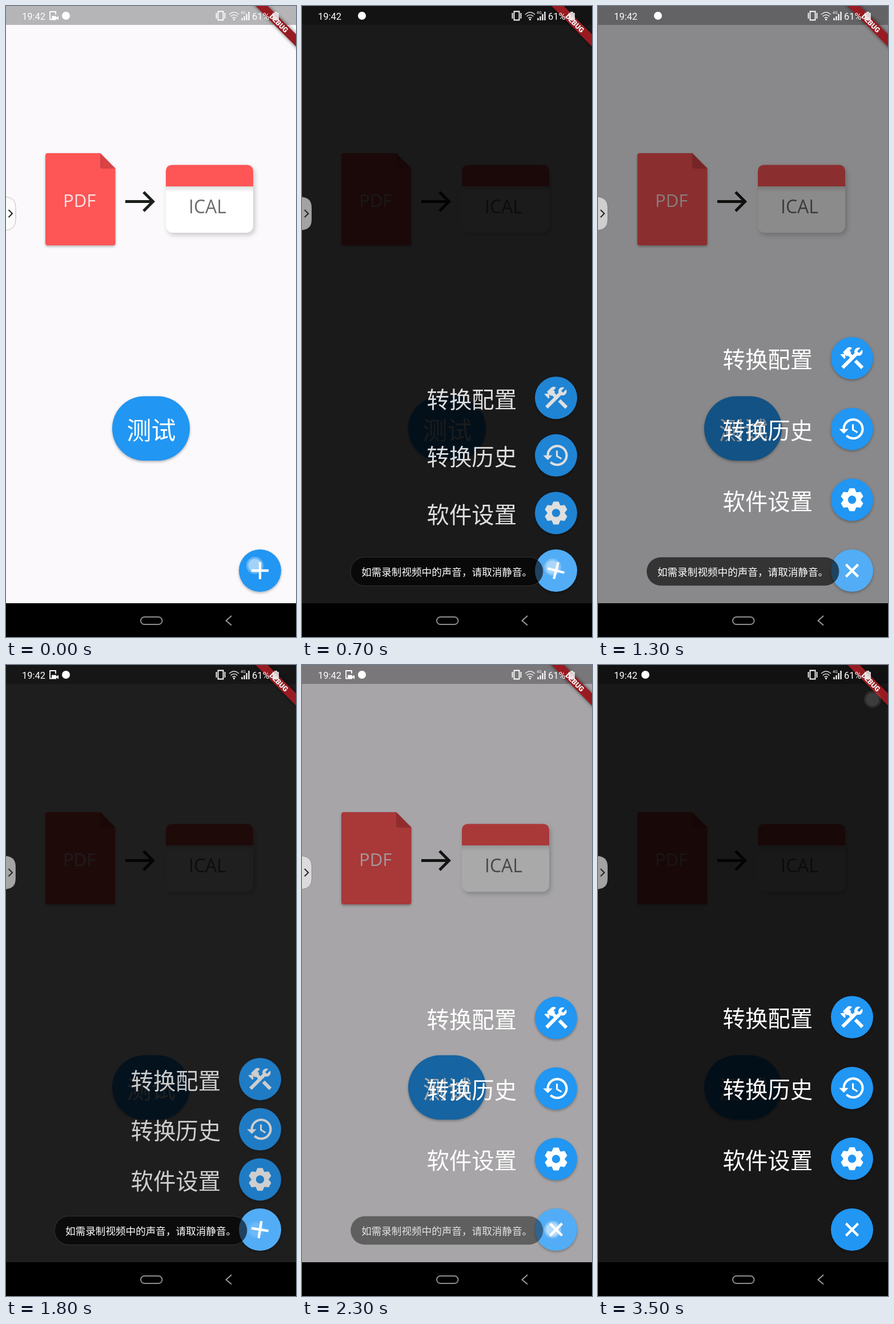
An HTML page for the animation above (3.6 s loop, 508 by 1102 pixels).

```html
<!DOCTYPE html>
<html lang="zh">
<head>
<meta charset="utf-8">
<style>
  html, body { margin: 0; width: 100%; height: 100%; overflow: hidden; background: #000; }
  svg { display: block; width: 100%; height: 100%; }
  .cjk { font-family: "Noto Sans CJK SC", "Noto Sans CJK", sans-serif; fill: #fff; }
  .ui { font-family: Roboto, sans-serif; fill: #fff; }
  .art { font-family: "Open Sans", "Noto Sans", sans-serif; }
  .blue { fill: #2196f3; }
  .lift { filter: drop-shadow(0 2px 2px rgba(0,0,0,.3)); }
  .line { fill: none; stroke: #fff; }
</style>
</head>
<body>
<svg viewBox="0 0 508 1102">
  <defs>
    <linearGradient id="fade" x2="0" y2="1">
      <stop stop-color="#ddd"/><stop offset="1" stop-color="#fff"/>
    </linearGradient>
  </defs>

  <!-- page -->
  <rect width="508" height="1102" fill="#fbf9fc"/>
  <g class="lift">
    <path d="M73 257H165L191.500 283.500V414q0 4-4 4H73q-4 0-4-4V261q0-4 4-4z" fill="#fe5556"/>
    <path d="M165 257V280q0 4 4 4H191.500z" fill="#d84345"/>
  </g>
  <text class="art" x="100" y="351" font-size="31" fill="#f8e4e6">PDF</text>
  <path d="M209 341.500H257M241 325l16.500 16.500L241 358" fill="none" stroke="#1b1f1b" stroke-width="5"/>
  <g style="filter:drop-shadow(3px 4px 4px rgba(0,0,0,.2))">
    <rect x="280" y="277.500" width="153" height="118.500" rx="12" fill="#fff"/>
    <rect x="280" y="315" width="153" height="10" fill="url(#fade)"/>
    <path d="M280 315V289.500q0-12 12-12H421q12 0 12 12V315z" fill="#fe5556"/>
  </g>
  <text class="art" x="320" y="362" font-size="32" fill="#6c6c6e">ICAL</text>
  <rect class="blue lift" x="186" y="681.500" width="136" height="112.500" rx="56.250"/>
  <text class="cjk" x="254.500" y="757" font-size="43" text-anchor="middle">测试</text>

  <rect id="shade" width="508" height="1102"/>
  <rect width="508" height="33" opacity=".28"/>

  <!-- menu -->
  <g id="menu"></g>
  <g transform="translate(445 986)">
    <circle class="blue lift" r="37"/>
    <circle id="glow" r="37" fill="#fff"/>
    <path id="plus" class="line" d="M-15 0H15M0-15V15" stroke-width="4.300"/>
  </g>

  <!-- corner banner -->
  <g transform="translate(508 0) rotate(45)">
    <rect x="-60" y="35" width="120" height="15" fill="#981b22" style="filter:drop-shadow(0 0 3px rgba(0,0,0,.6))"/>
    <text class="ui" y="47" font-size="12.500" font-weight="900" text-anchor="middle">DEBUG</text>
  </g>

  <!-- status bar -->
  <text class="ui" x="28" y="23.500" font-size="16.500">19:42</text>
  <g id="rec">
    <path class="line" d="M80 23.500H77V10H87V15" stroke-width="1.800"/>
    <path d="M80 17.500h8v2.500l4-2.500v7l-4-2.500v2.500h-8z" fill="#fff"/>
  </g>
  <circle id="note" cy="17" r="7" fill="#fff"/>
  <path class="line" d="M371.500 9.500h9v15h-9zM368.500 12v10M383.500 12v10" stroke-width="1.800"/>
  <g class="line" stroke-width="1.600">
    <path d="M391 15q8.500-8 17 0M393.700 18.200q5.800-5.400 11.600 0M396.500 21.300q3-2.800 6 0" opacity=".85"/>
  </g>
  <circle cx="399.500" cy="23.500" r="1.500" fill="#fff"/>
  <text class="ui" x="411" y="14" font-size="7">4G</text>
  <path class="line" d="M413.500 25v-4M417.500 25v-7M421.500 25v-11M425.500 25V10" stroke-width="2.200"/>
  <text class="ui" x="431" y="23.500" font-size="16.500">61%</text>
  <path d="M470 10h5v2h3v13h-11V12h3z" fill="#eee" opacity=".85"/>

  <!-- side handle -->
  <path d="M-2 333.500H1q16 2 16 18v22q0 16-16 18H-2z" fill="#fff" fill-opacity=".6" stroke="#000" stroke-opacity=".25"/>
  <path d="M4.500 356l6.500 6.500-6.500 6.500" fill="none" stroke="#222" stroke-width="2"/>

  <!-- navigation bar -->
  <rect y="1043" width="508" height="59"/>
  <rect x="236" y="1067" width="37.500" height="13" rx="6.500" fill="none" stroke="#8d8d8d" stroke-width="2"/>
  <path d="M395 1065l-9.500 8.500 9.500 8" fill="none" stroke="#999" stroke-width="2"/>

  <g id="toast">
    <rect x="85" y="962.500" width="337.500" height="50" rx="25" fill-opacity=".62" stroke="#fff" stroke-opacity=".13"/>
    <text class="cjk" x="104" y="994.500" font-size="17.600">如需录制视频中的声音，请取消静音。</text>
  </g>
  <g id="finger" fill="#fff">
    <circle r="15" opacity=".3"/>
    <circle r="11.500" opacity=".4"/>
  </g>
</svg>
<script>
const $ = id => document.getElementById(id);
const clamp = x => Math.max(0, Math.min(1, x));
const ramp = (t, from, length) => clamp((t - from) / length);
const LOOP = 3600, GAP = 123.67;

const tooth = '<path d="M-4.200-5L-2.200-9.700H2.200L4.200-5z" transform="rotate(ANGLE)"/>';
const gear = '<g transform="translate(12 12)"><circle r="5.400" fill="none" stroke="#fff" stroke-width="3.800"/>' +
  [0, 60, 120, 180, 240, 300].map(a => tooth.replace('ANGLE', a)).join('') + '</g>';
const clock = '<path d="M13 3c-4.970 0-9 4.030-9 9H1l3.890 3.890.070.140L9 12H6c0-3.870 3.130-7 7-7s7 3.130 7 7-3.130 7-7 7c-1.930 0-3.680-.790-4.940-2.060l-1.420 1.420C8.270 19.990 10.510 21 13 21c4.970 0 9-4.030 9-9s-4.030-9-9-9zm-1 5v5l4.280 2.540.720-1.210-3.500-2.080V8z"/>';
const tools = '<path d="M13.780 15.300l6 6 2.110-2.110-6-6zM17.500 10c1.930 0 3.500-1.570 3.500-3.500 0-.580-.160-1.120-.410-1.600l-2.700 2.700-1.490-1.490 2.700-2.700c-.480-.250-1.020-.410-1.600-.410C15.570 3 14 4.570 14 6.500c0 .410.080.800.210 1.160l-1.850 1.850-1.780-1.780.710-.710-1.410-1.410L12 3.490c-1.170-1.170-3.070-1.170-4.240 0L4.220 7.030l1.410 1.410H2.810l-.710.710 3.540 3.540.710-.710V9.150l1.410 1.410.710-.710 1.780 1.780-7.410 7.410 2.120 2.120L16.340 9.790c.360.130.750.210 1.160.210z"/>';

const items = [['软件设置', gear], ['转换历史', clock], ['转换配置', tools]];
$('menu').innerHTML = items.map(([label, icon]) => `<g>
  <text class="cjk" x="-226.500" y="17.500" font-size="39.400">${label}</text>
  <circle class="blue lift" r="37"/>
  <g fill="#fff" transform="scale(2.060) translate(-12 -12)">${icon}</g></g>`).join('');
const rows = [...$('menu').children];

// [finger down, menu starts to move]; taps open and close in turn
const taps = [[0, 75], [580, 593], [1130, 1175], [1650, 1666], [2190, 2207]];
const spots = [[436, 977], [439, 980], [439, 982], [438, 986], [439, 986]];

function menuState(t) {
  const i = taps.filter(tap => tap[1] <= t).length - 1;
  if (i < 0) return { spread: 0, shade: 0, turn: 0 };
  const v = ramp(t, taps[i][1], 250);
  if (i % 2) return { spread: 1 - v ** 2, shade: 1 - v ** 6, turn: (1 - v) ** 2 };
  const spread = 1 - (1 - ramp(t, taps[i][1], 100)) ** 2;
  return { spread, shade: v, turn: spread };
}

function draw(t) {
  const { spread, shade, turn } = menuState(t);
  $('shade').setAttribute('opacity', .9 * shade);
  $('menu').setAttribute('opacity', spread ** .7);
  rows.forEach((row, i) => row.setAttribute('transform', `translate(445 ${986 - (i + 1) * GAP * spread})`));
  $('plus').setAttribute('transform', `rotate(${45 * turn})`);

  const last = taps.filter(tap => tap[0] <= t).length - 1;
  const held = t - taps[last][0];
  $('glow').setAttribute('opacity', .22 * ramp(held, 0, 80) * (1 - ramp(held, 200, 150)));

  const late = t >= 3400;
  const [x, y] = late ? [481, 60] : spots[last];
  $('finger').setAttribute('transform', `translate(${x} ${y})`);
  $('finger').setAttribute('opacity', late ? .27 : 1 - ramp(held, 115, 50));

  $('toast').setAttribute('opacity', ramp(t, 300, 150) * (1 - ramp(t, 2250, 160)));
  $('rec').setAttribute('opacity', (t + 400) % 2000 < 1000 ? 1 : 0);
  $('note').setAttribute('cx', late ? 83 : 105);
}

function tick(now) {
  draw(now % LOOP);
  requestAnimationFrame(tick);
}
draw(0);
requestAnimationFrame(tick);
</script>
</body>
</html>
```
